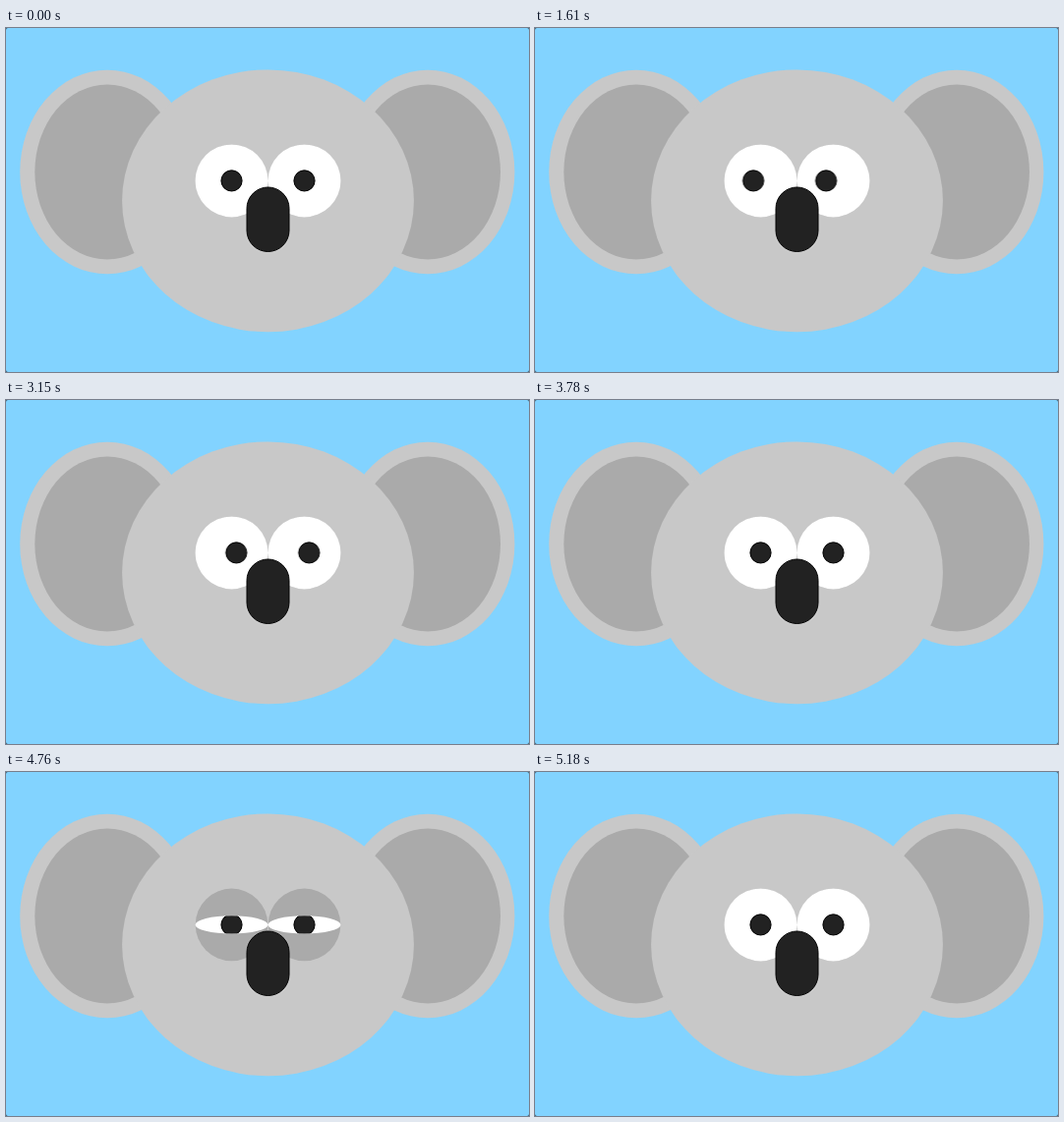
An HTML page that plays this animation: 532x350 px, repeating every 5.25 s.

```html
<!DOCTYPE html>
<html lang="en">
<head>
<meta charset="utf-8">
<title>Koala</title>
<style>
  html, body { margin: 0; width: 100%; height: 100%; overflow: hidden; background: #2f4a58; }
  svg { display: block; width: 532px; height: 350px; }

  .sky { fill: #82d3ff; }
  .fur { fill: #c8c8c8; }
  .shade { fill: #aaa; }
  .white { fill: #fff; }
  .dark { fill: #222; stroke: #000; }

  .pupils { animation: gaze 5250ms infinite cubic-bezier(.4, 0, .05, 1); }
  .opening { animation: blink 5250ms infinite linear; }

  /* centre, left, right, centre */
  @keyframes gaze {
    0%, 16% { transform: translateX(0); }
    32%, 36% { transform: translateX(-7.4px); }
    52%, 56% { transform: translateX(7.4px); }
    72%, 100% { transform: translateX(0); }
  }

  /* quick close, short rest, slow open */
  @keyframes blink {
    0%, 78.8% { ry: 37px; }
    81.2% { ry: 0px; }
    86.5% { ry: 0px; animation-timing-function: ease-in-out; }
    98.7%, 100% { ry: 37px; }
  }
</style>
</head>
<body>
<svg viewBox="0 0 532 350" aria-label="Koala looking around and blinking">
  <defs>
    <clipPath id="eyes">
      <ellipse class="opening" cx="229.5" cy="155.4" rx="37" ry="37"/>
      <ellipse class="opening" cx="303.5" cy="155.4" rx="37" ry="37"/>
    </clipPath>
  </defs>

  <rect class="sky" width="532" height="350" rx="2"/>

  <g id="ears">
    <ellipse class="fur" cx="103" cy="146.5" rx="88.8" ry="103.8"/>
    <ellipse class="shade" cx="103" cy="146.5" rx="73.7" ry="89"/>
    <ellipse class="fur" cx="429" cy="146.5" rx="88.4" ry="103.8"/>
    <ellipse class="shade" cx="429" cy="146.5" rx="74" ry="89"/>
  </g>

  <ellipse class="fur" cx="266.5" cy="175.8" rx="148.4" ry="133.4"/>

  <g id="lids" class="shade">
    <circle cx="229.5" cy="155.4" r="36.8"/>
    <circle cx="303.5" cy="155.4" r="36.8"/>
  </g>

  <g clip-path="url(#eyes)">
    <rect class="white" x="190" y="115" width="153" height="80"/>
    <g class="pupils dark">
      <circle cx="229.5" cy="155.4" r="10.6"/>
      <circle cx="303.5" cy="155.4" r="10.6"/>
    </g>
  </g>

  <rect class="dark" x="245" y="162" width="43" height="65.5" rx="21.5"/>
</svg>
</body>
</html>
```
